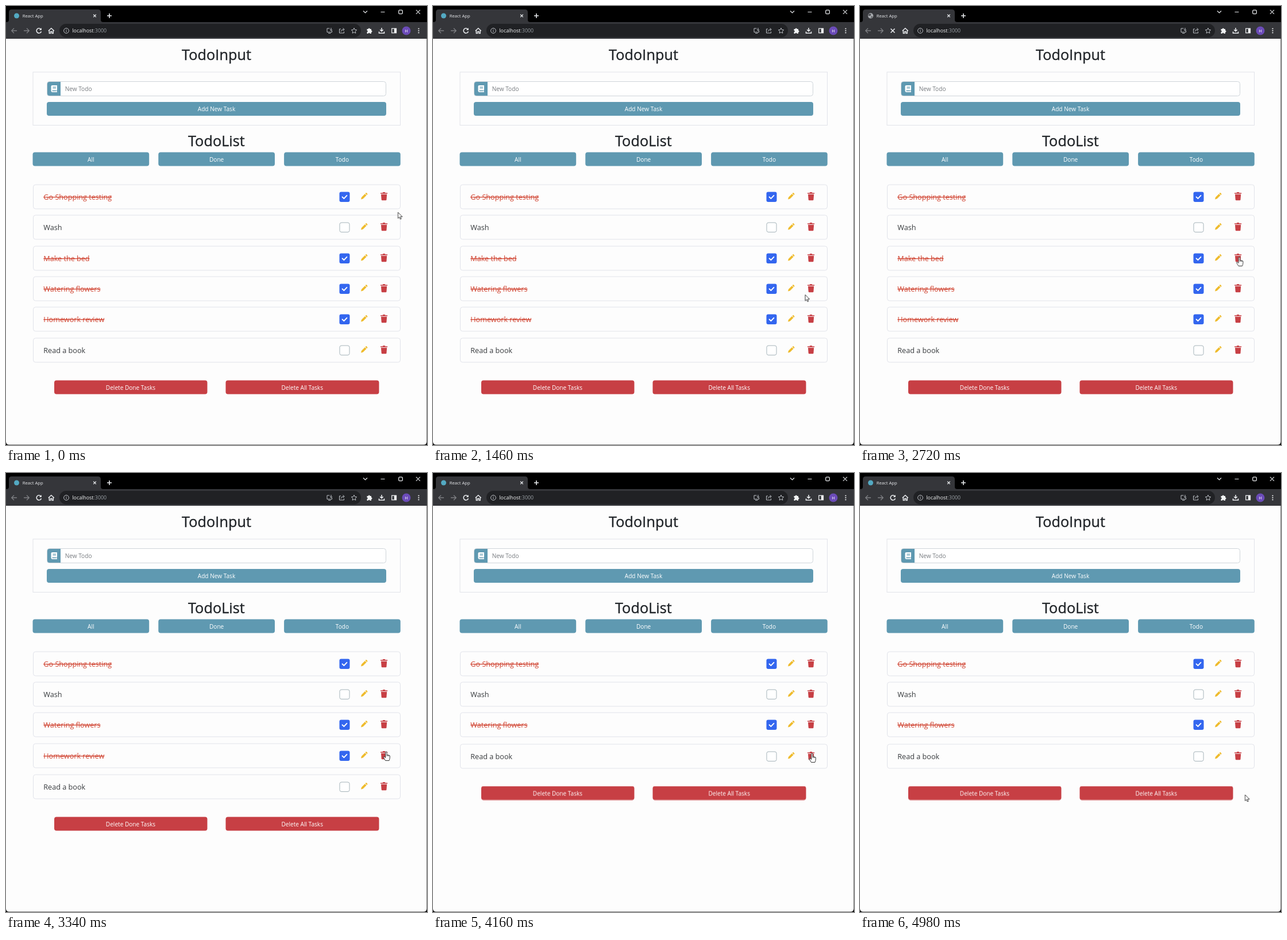
These frames come from a looping animation (733 px wide and 764 px high, 5000 ms). An HTML page:

```html
<!DOCTYPE html>
<html lang="en">
<head>
<meta charset="utf-8">
<title>React App</title>
<style>
  html, body { margin: 0; width: 100%; height: 100%; overflow: hidden; background: #000; }
  svg { display: block; width: 733px; height: 764px; font: 10.1px "Open Sans", "Noto Sans", sans-serif; }
  .mid { text-anchor: middle; }
  .head { font-size: 25.3px; fill: #212529; stroke: #212529; stroke-width: .4px; }
  .btn { fill: #fff; text-anchor: middle; }
  .teal { fill: #5f99b1; }
  .red { fill: #c73f44; }
  .box { fill: none; stroke: #e1e3ea; }
  .task { font-size: 12.63px; fill: #383b3e; }
  .done { fill: #d0422f; text-decoration: line-through; }
  .line { fill: none; stroke: #e8eaed; stroke-width: 1.3; }
  .dim { stroke: #7d7f83; }

  /* Hard changes: the list shrinks at 2860 ms and 4060 ms */
  .shift, .gone1, .gone2, .busy, .idle, .hand, .arrow { animation: 5s step-end infinite; }
  .shift { animation-name: shift; }
  .gone1 { animation-name: gone1; }
  .gone2 { animation-name: gone2; }
  .busy { animation-name: busy; }
  .idle { animation-name: idle; }
  .hand { animation-name: hand; }
  .arrow { animation-name: arrow; }
  .pointer { animation: move 5s ease-in-out infinite; }

  @keyframes shift {
    0% { transform: none; }
    57.2% { transform: translateY(var(--first)); }
    81.2%, 100% { transform: translateY(var(--second)); }
  }
  @keyframes gone1 { 0% { opacity: 1; } 57.2%, 100% { opacity: 0; } }
  @keyframes gone2 { 0% { opacity: 1; } 81.2%, 100% { opacity: 0; } }
  @keyframes busy {
    0%, 57.2%, 81.2%, 100% { opacity: 0; }
    52.4%, 76.4% { opacity: 1; }
  }
  @keyframes idle {
    0%, 57.2%, 81.2%, 100% { opacity: 1; }
    52.4%, 76.4% { opacity: 0; }
  }
  @keyframes hand {
    0%, 60.6%, 88.6%, 100% { opacity: 0; }
    39.6%, 62.6% { opacity: 1; }
  }
  @keyframes arrow {
    0%, 60.6%, 88.6%, 100% { opacity: 1; }
    39.6%, 62.6% { opacity: 0; }
  }
  @keyframes move {
    0% { transform: translate(682.5px, 359px); }
    15.6% { transform: translate(678.5px, 405px); }
    29.2% { transform: translate(648px, 502.5px); }
    42%, 59% { transform: translate(660.5px, 437px); }
    64%, 66.8% { transform: translate(662px, 485px); }
    83.2%, 86% { transform: translate(660px, 488px); }
    97%, 100% { transform: translate(670.5px, 560px); }
  }
</style>
</head>
<body>
<svg viewBox="0 0 733 764">
  <defs>
    <g id="pencil" fill="#efbb2c">
      <path d="M618 336.5l.9-3.6 6-6 2.7 2.7-6 6ZM625.6 326.2l.9-.9q.7-.5 1.3 0l1.4 1.4q.5.6 0 1.3l-.9.9Z"/>
    </g>
    <g id="trash" class="red">
      <path d="M652 325.2h3.6l.8-1.2h3.4l.8 1.2h3.6v1.6h-12.2ZM653 327.8h10.2l-.7 9.2q-.1 1.2-1.3 1.2h-6.2q-1.2 0-1.3-1.2Z"/>
    </g>
    <g id="checked">
      <rect x="580.5" y="323.5" width="18" height="17.5" rx="3" fill="#3366ef"/>
      <path d="M585.6 332.4l2.8 2.7 5-5.2" fill="none" stroke="#fff" stroke-width="2" stroke-linecap="round" stroke-linejoin="round"/>
    </g>
    <rect id="unchecked" x="581" y="324" width="17" height="16.5" rx="3" fill="#fff" stroke="#a5b3b9"/>
  </defs>

  <!-- Browser window -->
  <path d="M1 28q4 0 4-4V11q0-5 5-5h150q5 0 5 5v13q0 4 4 4Z" fill="#35363a"/>
  <rect y="28" width="733" height="29" fill="#35363a"/>
  <rect x="93" y="31" width="525" height="23.5" rx="11.7" fill="#202124"/>
  <circle class="idle" cx="18.5" cy="17" r="4.5" fill="#53a9c2"/>
  <g class="busy">
    <circle cx="18.5" cy="17" r="4.7" fill="#a5a8ac"/>
    <path d="M15 14.5q3-2 4 0t-2 2.500-2.500 0ZM19 18.500q3-1 3 0t-2.500 2.300Z" fill="#4a4c50"/>
  </g>
  <text x="28.700" y="20" font-size="7.7" fill="#e8eaed">React App</text>
  <g class="line">
    <path d="M152.200 14.800l4.600 4.600M156.800 14.800l-4.600 4.600"/>
    <path d="M176 17h8M180 13v8" stroke-width="1.6"/>
    <path d="M622 8.500l3.500 3.500 3.500-3.500M652.500 10.500h7M714 6.800l7 7M721 6.800l-7 7" stroke-width="1.1"/>
    <rect x="683.800" y="7.200" width="6.500" height="6.500" rx="1.500"/>
    <path class="dim" d="M19 43h-9M14 38.700l-4.300 4.300 4.300 4.300M31 43h9M36 38.700l4.300 4.300-4.300 4.300"/>
    <g class="idle" stroke-width="1.600">
      <path d="M60.500 40.200a4.200 4.200 0 1 0 .9 4"/>
      <path d="M61.800 38v4h-4Z" fill="#e8eaed" stroke="none"/>
    </g>
    <path class="busy" d="M53.500 39.500l7 7M60.500 39.500l-7 7" stroke-width="1.600"/>
    <path d="M73.800 43.300l5-4.600 5 4.600M75.300 42.500v5h2.300v-3h2.400v3h2.300v-5" stroke-width="1.400"/>
    <g stroke="#bdc1c6" stroke-width="1">
      <circle cx="105" cy="43" r="4.400"/>
      <path d="M105 42.300v3M105 40.300v1.100"/>
      <path d="M563.500 39H559v6.500h8.500V43M561 47.500h4.500M566 38v4.500M564 41l2 2 2-2"/>
      <path d="M583 40h-2.500v7h8v-2.500M583 44.500q.5-3.500 5-3.700M586.500 38.500l2.700 2.300-2.700 2.300"/>
      <path d="M606 38.300l1.400 3 3.300.4-2.400 2.300.6 3.300-2.900-1.600-2.900 1.600.6-3.300-2.400-2.300 3.300-.4Z"/>
    </g>
    <path d="M654 38v5.500M651.300 41.200l2.700 2.700 2.700-2.700M649.500 44.500v2.800h9v-2.800" stroke-width="1.600"/>
    <rect x="671.700" y="39.200" width="7.800" height="7.600"/>
  </g>
  <text x="115.300" y="46" font-size="8.9" fill="#f1f3f4">localhost<tspan fill="#9aa0a6">:3000</tspan></text>
  <g fill="#f1f3f4">
    <path d="M628.500 40h2.200a1.500 1.500 0 0 1 3 0h2.300v2.500a1.500 1.500 0 0 1 0 3V48h-2.600a1.300 1.300 0 0 0-2.600 0h-2.300v-2.600a1.300 1.300 0 0 0 0-2.600Z"/>
    <path d="M675.800 39h4v8h-4Z"/>
    <circle cx="718.500" cy="39.500" r="1.100"/><circle cx="718.500" cy="43" r="1.100"/><circle cx="718.500" cy="46.500" r="1.100"/>
  </g>
  <circle cx="697" cy="43" r="7.500" fill="#6b4bb8"/>
  <text class="btn" x="697" y="45.800" font-size="7.6">H</text>

  <!-- Page -->
  <path d="M0 57h732.500v701q0 5.500-5.500 5.500H5.500q-5.500 0-5.500-5.500Z" fill="#fdfdfd"/>
  <text class="mid head" x="366.500" y="94">TodoInput</text>
  <rect class="box" x="47" y="115" width="639.500" height="92.500"/>
  <rect x="71.500" y="131.500" width="590" height="25" rx="4" fill="#fff" stroke="#cfd5da"/>
  <path class="teal" d="M95 132v24H75.500q-3.500 0-3.500-3.500v-17q0-3.500 3.500-3.500Z"/>
  <path d="M80.500 138h8.500v8.500h-.7v2h.7v1.500h-8.500q-2-.2-2-2.200v-7.800q0-2 2-2Z" fill="#fff"/>
  <path class="teal" d="M81.500 140.500h5.500v.9h-5.500ZM81.500 142.500h5.500v.9h-5.500ZM80.500 146.700h7v1.500h-7Z"/>
  <text x="102.700" y="148" fill="#787c80">New Todo</text>
  <rect class="teal" x="71" y="167" width="591" height="24" rx="4"/>
  <text class="btn" x="366.500" y="183">Add New Task</text>

  <text class="mid head" x="366.300" y="244">TodoList</text>
  <g id="filters"></g>
  <g id="list"></g>

  <g class="shift" style="--first:-53px;--second:-106.500px">
    <rect class="red" x="84" y="651.500" width="266.500" height="24" rx="4"/>
    <rect class="red" x="382.500" y="651.500" width="267" height="24" rx="4"/>
    <text class="btn" x="217" y="667.500">Delete Done Tasks</text>
    <text class="btn" x="515.700" y="667.500">Delete All Tasks</text>
  </g>

  <g class="pointer" fill="#fff" stroke="#222" stroke-width=".9" stroke-linejoin="round">
    <path class="arrow" d="M0 0V10.500L2.400 8.300 4 12 5.700 11.300 4.200 7.700H7.600Z"/>
    <g class="hand">
      <path d="M-1.300 8.500V1.200a1.200 1.200 0 0 1 2.400 0V5.600L4.800 6.200Q6.600 6.600 6.500 8.500L6 12.500 5 15.500H-1.500L-4.600 10.200Q-5.200 8.600-3.600 8.600L-1.300 10.400Z"/>
      <path d="M1.100 5.600v2.400M3 6v2M4.800 6.300v2" fill="none" stroke-width=".7"/>
    </g>
  </g>
</svg>
<script>
  const byId = id => document.getElementById(id);

  byId("filters").innerHTML = ["All", "Done", "Todo"].map((label, i) => {
    const x = 46.5 + 218.8 * i;
    return `<rect class="teal" x="${x}" y="254.500" width="202.700" height="24" rx="4"/>
      <text class="btn" x="${x + 101.300}" y="270.500">${label}</text>`;
  }).join("");

  const tasks = [
    { text: "Go Shopping testing", done: true },
    { text: "Wash" },
    { text: "Make the bed", done: true, gone: "gone1" },
    { text: "Watering flowers", done: true, first: -54, second: -54 },
    { text: "Homework review", done: true, gone: "gone2", first: -53, second: -53 },
    { text: "Read a book", first: -53, second: -106 }
  ];

  byId("list").innerHTML = tasks.map(({ text, done, gone = "", first = 0, second = 0 }, i) => `
    <g class="${gone}"><g class="shift" style="--first:${first}px;--second:${second}px">
      <g transform="translate(0 ${Math.round(53.33 * i)})">
        <rect class="box" x="47.500" y="311" width="639" height="42" rx="4"/>
        <text class="task ${done ? "done" : ""}" x="65.300" y="337">${text}</text>
        <use href="#${done ? "checked" : "unchecked"}"/>
        <use href="#pencil"/>
        <use href="#trash"/>
      </g>
    </g></g>`).join("");
</script>
</body>
</html>
```
